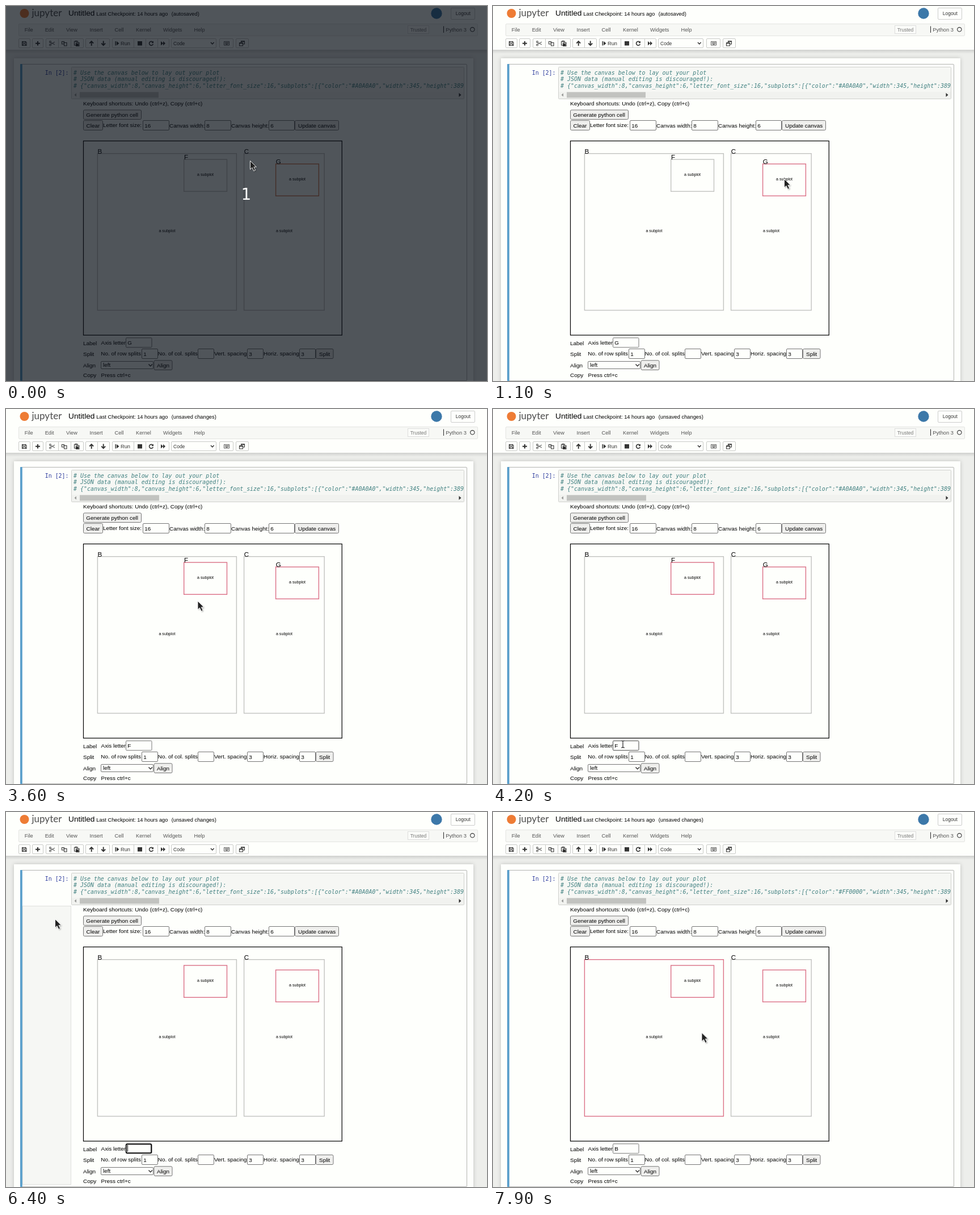
Write an HTML page that moves like this. It is 848 px wide and 660 px high and loops after 8000 ms.

```html
<!DOCTYPE html>
<html lang="en">
<head>
<meta charset="utf-8">
<title>Notebook plot layout</title>
<style>
html, body { margin: 0; width: 100%; height: 100%; overflow: hidden; background: #edeeeb; }
svg { display: block; width: 848px; height: 660px; }
text { font-family: "Liberation Sans", Arial, sans-serif; font-size: 9.95px; fill: #000; white-space: pre; }
.menu { font-size: 9.25px; fill: #555; }
.small { font-size: 8.53px; fill: #333; }
.code { font-family: "DejaVu Sans Mono", monospace; fill: #408080; font-style: italic; }
.prompt { font-family: "DejaVu Sans Mono", monospace; fill: #303f9f; }
.tiny { font-size: 7.15px; text-anchor: middle; }
.letter { font-size: 11.6px; }
.icon { fill: #333; }
.line { fill: none; stroke: #333; stroke-width: 1.1; }
</style>
</head>
<body>
<svg id="stage" viewBox="0 0 848 660" xmlns="http://www.w3.org/2000/svg">
  <defs>
    <filter id="glow" x="-5%" y="-5%" width="110%" height="110%"><feGaussianBlur stdDeviation="3.5"/></filter>
    <filter id="soft" x="-50%" y="-50%" width="200%" height="200%"><feGaussianBlur stdDeviation="1"/></filter>
    <linearGradient id="edge" x2="0" y2="1">
      <stop offset="0" stop-color="#cfd0ce"/><stop offset="1" stop-color="#edeeeb"/>
    </linearGradient>
    <clipPath id="codeClip"><rect x="116" y="108" width="691.5" height="42"/></clipPath>
  </defs>
  <g id="page"></g>
  <rect id="dim" width="848" height="660" fill="#080e16" fill-opacity=".7"/>
  <text id="count" x="423.5" y="340.5" text-anchor="middle"
    style="font:27.5px 'DejaVu Sans',sans-serif;fill:#fff">1</text>
  <g id="arrow">
    <path d="M2 2V17L5.5 14L8 20L11 18.5L8.5 13H13Z" fill="#000" opacity=".3" filter="url(#soft)"/>
    <path d="M.5 .5V15.6L4 12.4L6.8 18.4L9.6 17L6.9 11.3H11.4Z" fill="#222" stroke="#fff" stroke-width=".9"/>
  </g>
  <g id="beam" fill="none">
    <path d="M-3-6H-1L0-5L1-6H3M0-5V5M-3 6H-1L0 5L1 6H3" stroke="#fff" stroke-width="2.4"/>
    <path d="M-3-6H-1L0-5L1-6H3M0-5V5M-3 6H-1L0 5L1 6H3" stroke="#111" stroke-width="1.1"/>
  </g>
</svg>
<script>
const WHITE = '#fefffc', PINK = '#db6f86', GRAY = '#c2c3c0';
const page = document.getElementById('page');
const byId = id => document.getElementById(id);

function add(tag, attrs, content) {
  const el = document.createElementNS('http://www.w3.org/2000/svg', tag);
  for (const k in attrs) el.setAttribute(k, attrs[k]);
  if (content) el.textContent = content;
  return page.appendChild(el);
}
const rect = (x, y, x2, y2, fill, stroke = 'none', more = {}) =>
  add('rect', { x, y, width: x2 - x, height: y2 - y, fill, stroke, ...more });
const text = (x, y, s, cls = '') => add('text', { x, y, class: cls }, s);
const path = (d, cls, more = {}) => add('path', { d, class: cls, ...more });

function button(x, y, x2, y2, label, tx, ty) {
  rect(x, y, x2, y2, '#efefed', '#767676', { rx: 2 });
  text(tx, ty, label);
}
function field(x, y, x2, y2, value) {
  const box = rect(x, y, x2, y2, WHITE, '#767676', { rx: 1.5 });
  return { box, label: text(x + 2.7, y + 12.3, value) };
}
function toolGroup(x, x2, ...dividers) {
  rect(x, 57.5, x2, 73.5, WHITE, '#c9cac8', { rx: 1.5 });
  dividers.forEach(d => path(`M${d} 57.5V73.5`, '', { stroke: '#c9cac8' }));
}

function header() {
  rect(0, 0, 848, 77, WHITE);
  rect(0, 77, 848, 84, 'url(#edge)');
  add('circle', { cx: 32.5, cy: 13, r: 8, fill: '#ee7c35' });
  add('text', { x: 45.5, y: 18, style: 'font:17px Lato,sans-serif;fill:#4e4e4e' }, 'jupyter');
  add('text', { x: 110, y: 17.3, style: 'font-size:13.7px' }, 'Untitled');
  add('text', { x: 159.3, y: 17.3, style: 'font-size:9.3px' }, 'Last Checkpoint: 14 hours ago');
  add('circle', { cx: 759, cy: 13, r: 9.7, fill: '#3c78a9' });
  rect(784.5, 3.5, 826.5, 23.5, WHITE, '#ccc', { rx: 1.5 });
  text(792.8, 16.4, 'Logout', 'small');

  rect(22.5, 31.5, 831.5, 52.5, '#f7f8f5', '#e4e5e2', { rx: 1.5 });
  const menus = { File: 32.7, Edit: 68.7, View: 106, Insert: 147.5, Cell: 191.5, Kernel: 229, Widgets: 277, Help: 331.5 };
  for (const m in menus) text(menus[m], 45, m, 'menu');
  rect(708.5, 34.5, 745.5, 48.5, '#fbfcf9', '#ddd');
  add('text', { x: 712.7, y: 44.7, class: 'small', style: 'fill:#777' }, 'Trusted');
  path('M771.5 35.5V47', 'line');
  text(775.3, 45, 'Python 3', 'menu');
  add('circle', { cx: 822.3, cy: 41.3, r: 3.7, class: 'line' });
}

function toolbar() {
  toolGroup(22.5, 42.5);
  toolGroup(46.5, 65.5);
  toolGroup(70.5, 136.5, 92.5, 114.5);
  toolGroup(140.5, 182.5, 161.5);
  toolGroup(187.5, 287.5, 225.5, 246.5, 267.5);
  toolGroup(291.5, 370.5);
  toolGroup(376.5, 400.5);
  toolGroup(405.5, 427.5);
  path('M28.5 62.5H34.5L36 64V69.5H28.5ZM30 62.5V65H34V62.5M30 69.5V67H34.5V69.5', 'line');
  path('M55 62H57V64.8H60V66.8H57V69.5H55V66.8H52V64.8H55Z', 'icon');
  path('M77 63.2L86 68M77 68L86 63.2', 'line', { style: 'stroke:#666' });
  [63, 68.5].forEach(cy => add('circle', { cx: 78, cy, r: 1.5, class: 'line', style: 'stroke:#666' }));
  path('M98.5 62.5H102.5V67H98.5ZM101 64.5H107V70H102.5V67', 'line');
  path('M120.5 62H126.5V64.5M120.5 62V69H123.5M123.5 64.5H129V70.5H123.5Z', 'line');
  path('M122 61H125V63H122ZM124 66H128V70H124Z', 'icon');
  path('M150.7 62V70M147.2 65.7L150.7 62.2L154.2 65.7', 'line', { style: 'stroke-width:1.9' });
  path('M171.7 61.5V69.5M168.2 65.7L171.7 69.2L175.2 65.7', 'line', { style: 'stroke-width:1.9' });
  path('M192.5 62H194V69.5H192.5ZM195 62L199.5 65.7L195 69.5Z', 'icon');
  add('text', { x: 202, y: 69.2, class: 'menu', style: 'fill:#333' }, 'Run');
  path('M232 62H240V69.5H232ZM273 62L277 65.7V62L281 65.7L277 69.5V65.7L273 69.5Z', 'icon');
  path('M258.8 63.6A3.5 3.5 0 1 0 259.4 67', 'line', { style: 'stroke-width:1.6' });
  path('M260 61.5V65.3H256.3Z', 'icon');
  text(295, 68.7, 'Code', 'small');
  path('M361 64L363.8 67L366.6 64', 'line', { style: 'stroke-width:1.5' });
  path('M384.5 62.5H393.5V69H384.5ZM386 64.5H392.5M386 66H392.5M387 67.5H391', 'line', { style: 'stroke-width:.8' });
  path('M411.5 65H417.5V70H411.5ZM414.5 65V62H420.5V67H417.5', 'line');
  path('M411 64.5H418V66.3H411ZM414 61.5H421V63.3H414Z', 'icon');
}

function cell() {
  rect(14, 92, 824, 680, '#575757', 'none', { opacity: .3, filter: 'url(#glow)' });
  rect(14, 92, 824, 680, WHITE);
  rect(25.5, 102.5, 812.5, 659.5, WHITE, '#b3b4b2', { rx: 1.5 });
  rect(25, 102, 28.8, 660, '#5a9fcb', 'none', { rx: 1 });
  text(68.7, 121, 'In [2]:', 'prompt');
  rect(115.5, 107.5, 807.5, 163.5, '#f6f7f4', '#cfd0cd', { rx: 1 });
  text(119, 121, '# Use the canvas below to lay out your plot', 'code');
  text(119, 132.3, '# JSON data (manual editing is discouraged!):', 'code');
  rect(116, 151, 807, 163, '#f1f2ef');
  path('M124 153.5V159.5L120.5 156.5Z', '', { fill: '#9a9b99' });
  path('M798.5 153V160L802.5 156.5Z', '', { fill: '#333' });
}

function controls() {
  text(136, 174.8, 'Keyboard shortcuts: Undo (ctrl+z), Copy (ctrl+c)');
  button(136.5, 183, 238.5, 199.5, 'Generate python cell', 141.3, 194.8);
  button(136.5, 201.5, 170.5, 218.5, 'Clear', 141.5, 213.7);
  text(171, 213, 'Letter font size:');
  field(241.5, 201.5, 287.5, 218.5, '16');
  text(288, 213.7, 'Canvas width:');
  field(350.5, 201.5, 396.5, 218.5, '8');
  text(397, 213.7, 'Canvas height:');
  field(463.5, 201.5, 508.5, 218.5, '6');
  button(509.5, 201.5, 586.5, 218.5, 'Update canvas', 515, 213.7);

  text(136, 597, 'Label');
  text(167.5, 595.7, 'Axis letter');
  text(136, 616.3, 'Split');
  text(167.3, 615.3, 'No. of row splits');
  field(239.5, 603.5, 267.5, 620.5, '1');
  text(267.8, 615.3, 'No. of col. splits');
  field(338.5, 603.5, 366.5, 620.5, '');
  text(367, 615.3, 'Vert. spacing');
  field(425.5, 603.5, 453.5, 620.5, '3');
  text(454, 615.3, 'Horiz. spacing');
  field(517.5, 603.5, 545.5, 620.5, '3');
  button(546.5, 603.5, 577, 620.5, 'Split', 552, 615.5);
  text(136, 635.5, 'Align');
  rect(167.5, 625.5, 259.5, 638.5, WHITE, '#767676', { rx: 1.5 });
  text(171, 635.3, 'left');
  path('M251.5 630.5L254.7 633.8L258 630.5', 'line', { style: 'stroke-width:1.5' });
  button(261, 623.8, 293, 640.5, 'Align', 266, 635.5);
  text(136, 652.7, 'Copy');
  text(167.5, 652.7, 'Press ctrl+c');
}

function subplot(x, y, x2, y2, name) {
  const box = rect(x, y, x2, y2, 'none', GRAY, { 'stroke-width': 1.4 });
  text((x + x2) / 2, (y + y2) / 2 + .4, 'a subplot', 'tiny');
  return { box, label: text(x + .2, y, name, 'letter') };
}

header();
toolbar();
cell();
const status = add('text', { x: 291.7, y: 17.3, style: 'font-size:9.3px' });
const json = add('text', { x: 119, y: 144, class: 'code', 'clip-path': 'url(#codeClip)' });
const thumb = rect(130, 151.5, 269, 161.5, '#c2c3c0');
const hover = rect(29.5, 165.5, 114.5, 655.5, '#f6f7f4', '#dfe0dd');
controls();
const axis = field(211.5, 584, 257, 600.8, '');
const ring = rect(211.8, 584.6, 256.2, 600.2, 'none', '#101010', { rx: 2, 'stroke-width': 2 });
const caret = path('M214.5 586V598', '', { stroke: '#000', 'stroke-width': 1 });
rect(136.5, 237.5, 592.3, 579.3, 'none', '#000', { 'stroke-width': 1.2 });
const plots = {
  B: subplot(161.4, 259.7, 406.4, 535.5, 'B'),
  C: subplot(419.6, 259.7, 561.2, 535.5, 'C'),
  F: subplot(313.7, 270, 389.5, 326.3, 'F'),
  G: subplot(475.6, 278, 551.4, 334.2, 'G')
};

// time, x, y of the pointer tip
const moves = [
  [0, 430, 272], [600, 478, 292], [700, 538, 320],
  [900, 530, 314], [1000, 519, 308], [1100, 513, 304],
  [2100, 478, 303], [2200, 398, 300], [2300, 354, 297],
  [3600, 337.5, 337.5], [3700, 290, 440], [3800, 240, 544],
  [4100, 231, 588], [4200, 229, 590],
  [6100, 160, 440], [6200, 92, 215], [6400, 86, 188],
  [6500, 102, 212], [6600, 162, 268], [6700, 207, 300], [6800, 173, 278],
  [7600, 192, 300], [7700, 270, 350], [7800, 376, 385], [7900, 367.5, 388]
];
const show = (el, on) => el.setAttribute('visibility', on ? 'visible' : 'hidden');
const within = (t, a, b) => t >= a && t < b;

function render(t) {
  const dark = t < 500;
  show(byId('dim'), dark);
  show(byId('count'), dark);

  const [, x, y] = moves.filter(m => m[0] <= t).pop();
  const typing = within(t, 4100, 6100);
  show(byId('arrow'), !typing);
  show(byId('beam'), typing);
  byId(typing ? 'beam' : 'arrow').setAttribute('transform', `translate(${x} ${y})`);

  status.textContent = t < 1500 ? '(autosaved)' : '(unsaved changes)';
  json.textContent = '# {"canvas_width":8,"canvas_height":6,"letter_font_size":16,"subplots":[{"color":"#' +
    (t < 7200 ? 'A0A0A0' : 'FF0000') + '","width":345,"height":389';
  thumb.setAttribute('width', t < 3000 ? 139 : 140);

  plots.G.box.setAttribute('stroke', dark ? '#d07850' : PINK);
  plots.F.box.setAttribute('stroke', t < 3000 ? GRAY : PINK);
  plots.B.box.setAttribute('stroke', t < 7200 ? GRAY : PINK);
  show(plots.F.label, t < 5500);
  show(plots.G.label, t < 5500);

  axis.label.textContent = t < 3000 ? 'G' : t < 5500 ? 'F' : t < 7200 ? '' : 'B';
  axis.box.setAttribute('stroke', typing ? '#444' : '#767676');
  show(ring, within(t, 4600, 7200));
  show(caret, within(t, 5800, 7200));
  show(hover, within(t, 6200, 6600));
}

const start = performance.now();
function tick() {
  render((performance.now() - start) % 8000);
  requestAnimationFrame(tick);
}
tick();
</script>
</body>
</html>
```
